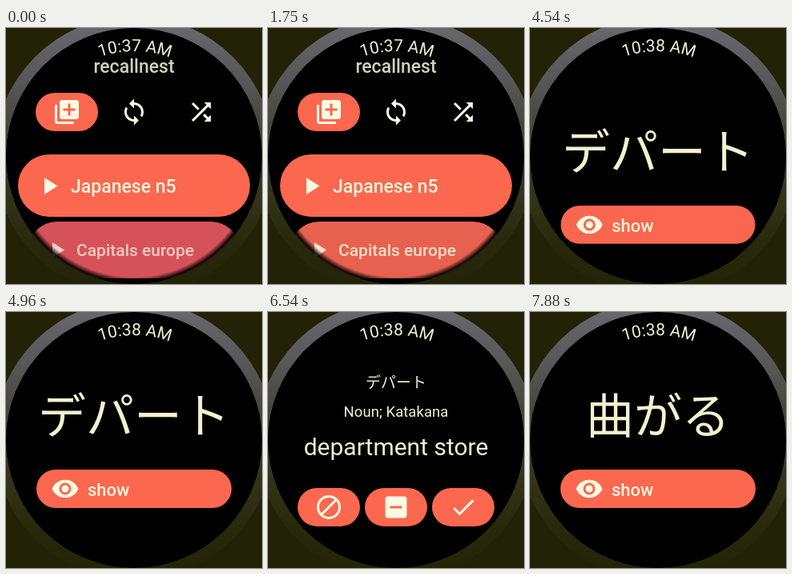
Write an HTML page that moves like this. It is 320 by 320 pixels and loops after 8000 ms.

```html
<!DOCTYPE html>
<html lang="ja">
<head>
<meta charset="utf-8">
<title>Flashcards on a watch</title>
<style>
html, body { margin: 0; width: 100%; height: 100%; overflow: hidden; background: #000; }
svg { display: block; width: 100vw; height: 100vh; font-family: Roboto, "Noto Sans CJK JP", "Noto Sans CJK", sans-serif; }
text { fill: #f3f1cf; }
.label { font-weight: 500; fill: #fff6da; }
.mid { text-anchor: middle; }
.jp { font-family: "Noto Sans CJK JP", "Noto Sans CJK", sans-serif; }
.chip { fill: #fc6750; }
.icon { fill: #fffae2; }
</style>
</head>
<body>
<svg viewBox="0 0 320 320">
  <defs>
    <linearGradient id="bezel" x1="0" y1="0" x2="0" y2="1">
      <stop offset="0" stop-color="#6a6a70"/>
      <stop offset=".22" stop-color="#58585a"/>
      <stop offset=".5" stop-color="#3c3c24"/>
      <stop offset=".8" stop-color="#29290c"/>
      <stop offset="1" stop-color="#222206"/>
    </linearGradient>
    <radialGradient id="rim" gradientUnits="userSpaceOnUse" cx="160" cy="160" r="160">
      <stop offset=".945" stop-opacity="0"/>
      <stop offset=".985" stop-opacity=".9"/>
    </radialGradient>
    <clipPath id="face"><circle cx="160" cy="160" r="159.5"/></clipPath>
    <path id="arc" d="M29 160A131 131 0 0 1 291 160"/>
  </defs>
  <rect width="320" height="320" fill="#222206"/>
  <circle cx="160" cy="160" r="175" fill="url(#bezel)"/>
  <circle cx="160" cy="160" r="160"/>
  <g clip-path="url(#face)">
    <g id="home"></g>
    <g id="question"></g>
    <g id="answer"></g>
  </g>
  <text class="mid" font-size="21"><textPath id="clock" href="#arc" startOffset="50.3%"></textPath></text>
</svg>
<script>
const LOOP = 8000;
const $ = id => document.getElementById(id);
const clamp = v => Math.max(0, Math.min(1, v));
const progress = (t, from, to) => clamp((t - from) / (to - from));
const mix = (a, b, p) => a.map((v, i) => v + (b[i] - v) * p);
const rgb = c => `rgb(${c.map(Math.round)})`;

const ICONS = {
  add: "M4 6H2v14c0 1.1.9 2 2 2h14v-2H4V6zm16-4H8c-1.1 0-2 .9-2 2v12c0 1.1.9 2 2 2h12c1.1 0 2-.9 2-2V4c0-1.1-.9-2-2-2zm-1 9h-4v4h-2v-4H9V9h4V5h2v4h4v2z",
  sync: "M12 4V1L8 5l4 4V6c3.31 0 6 2.69 6 6 0 1.01-.25 1.97-.7 2.8l1.46 1.46C19.54 15.03 20 13.57 20 12c0-4.42-3.58-8-8-8zm0 14c-3.31 0-6-2.69-6-6 0-1.01.25-1.97.7-2.8L5.24 7.74C4.46 8.97 4 10.43 4 12c0 4.42 3.58 8 8 8v3l4-4-4-4v3z",
  shuffle: "M10.59 9.17L5.41 4 4 5.41l5.17 5.17zM14.5 4l2.04 2.04L4 18.59 5.41 20 17.96 7.46 20 9.5V4zm.33 9.41l-1.41 1.41 3.13 3.13L14.5 20H20v-5.5l-2.04 2.04z",
  play: "M8 5v14l11-7z",
  eye: "M12 4.5C7 4.5 2.73 7.61 1 12c1.73 4.39 6 7.5 11 7.5s9.27-3.11 11-7.5c-1.73-4.39-6-7.5-11-7.5zM12 17a5 5 0 1 1 0-10 5 5 0 0 1 0 10zm0-8a3 3 0 1 0 0 6 3 3 0 0 0 0-6z",
  block: "M12 2a10 10 0 1 0 0 20 10 10 0 0 0 0-20zM4 12c0-4.42 3.58-8 8-8 1.85 0 3.55.63 4.9 1.69L5.69 16.9C4.63 15.55 4 13.85 4 12zm8 8c-1.85 0-3.55-.63-4.9-1.69L18.31 7.1C19.37 8.45 20 10.15 20 12c0 4.42-3.58 8-8 8z",
  partial: "M19 3H5c-1.1 0-2 .9-2 2v14c0 1.1.9 2 2 2h14c1.1 0 2-.9 2-2V5c0-1.1-.9-2-2-2zm-2 10H7v-2h10v2z",
  check: "M9 16.17L4.83 12l-1.42 1.41L9 19 21 7l-1.41-1.41z"
};

const icon = (name, x, y, scale = 1.5) =>
  `<path class="icon" d="${ICONS[name]}" transform="translate(${x} ${y}) scale(${scale}) translate(-12 -12)"/>`;
const pill = (x, y, w, h, attrs = "") =>
  `<rect class="chip" x="${x}" y="${y}" width="${w}" height="${h}" rx="${h / 2}" ${attrs}/>`;
const text = (str, x, y, size, cls = "mid", attrs = "") =>
  `<text class="${cls}" x="${x}" y="${y}" font-size="${size}" ${attrs}>${str}</text>`;
// A list row, remembered by its resting centre and height
const row = (y, h, body) => `<g class="row" data-y="${y}" data-h="${h}">${body}</g>`;

$("home").innerHTML =
  text("recallnest", 160, 56, 23, "label mid", 'style="fill:#d2d1bb"') +
  pill(37, 81, 78, 48, 'id="newBtn"') + pill(121, 81, 78, 48, 'id="reviewBtn"') +
  icon("add", 76, 105) + icon("sync", 160, 105) + icon("shuffle", 244, 105) +
  pill(15, 158, 290, 78) + icon("play", 54, 197.5) +
  text("Japanese n5", 81, 206, 23, "label") +
  pill(28, 242, 264, 71, 'id="secondChip"') +
  `<g id="secondLabel">${icon("play", 63.5, 277.5, 1.37)}${text("Capitals europe", 88, 285, 21, "label")}</g>` +
  '<circle cx="160" cy="160" r="160" fill="url(#rim)"/>';

$("question").innerHTML =
  row(128, 60, text("", 160, 152, 60, "mid jp", 'id="word"')) +
  row(221, 48, pill(38, 197, 244, 48) + icon("eye", 74, 221) + text("show", 102, 230, 22, "label"));

$("answer").innerHTML =
  row(88, 20, text("デパート", 160, 95, 19, "mid jp")) +
  row(125, 20, text("Noun; Katakana", 160, 131, 18.6)) +
  row(169, 34, text("department store", 160, 179, 30)) +
  row(244, 48, ["block", "partial", "check"].map((name, i) =>
    pill(37 + 84 * i, 220, 78, 48) + icon(name, 76 + 84 * i, 244)).join(""));

// Rows shrink and dim as they come near the top or bottom edge
function scrollList(id, offset) {
  for (const el of $(id).querySelectorAll(".row")) {
    const y = +el.dataset.y, half = el.dataset.h / 2, at = y + offset;
    const gap = Math.min(at - half, 320 - at - half);
    const near = clamp((52 - gap) / 52);
    el.setAttribute("transform", `translate(160 ${at}) scale(${1 - 0.1 * near}) translate(-160 ${-y})`);
    el.setAttribute("opacity", 1 - 0.2 * near);
  }
}

function show(id, on) { $(id).setAttribute("display", on ? "inline" : "none"); }

function drawHome(t) {
  const settle = progress(t, 0, 830), dim = progress(t, 1670, 1750);
  const settled = mix([214, 82, 90], [243, 101, 80], settle);
  $("secondChip").style.fill = rgb(mix(settled, [231, 97, 80], dim));
  $("secondLabel").setAttribute("opacity", 0.75 + 0.15 * settle - 0.05 * dim);

  const swap = progress(t, 2090, 2210);
  const ripple = swap * (1 - progress(t, 2340, 2540));
  $("newBtn").style.opacity = 1 - swap;
  $("reviewBtn").style.opacity = swap;
  $("reviewBtn").style.fill = rgb(mix([252, 103, 80], [255, 132, 110], ripple));
}

function draw(t) {
  show("home", t < 3500);
  show("question", (t >= 3580 && t < 5540) || t >= 7880);
  show("answer", t >= 5580 && t < 7830);
  $("clock").textContent = t < 2460 ? "10:37 AM" : "10:38 AM";

  drawHome(t);

  $("word").textContent = t < 7000 ? "デパート" : "曲がる";
  const lift = 1 - (1 - progress(t, 4500, 4790)) ** 1.7;
  scrollList("question", t < 4960 ? 32 - 31 * lift : 0);

  const reveal = 1 - (1 - progress(t, 6100, 6880)) ** 1.63;
  scrollList("answer", 72 - 97 * reveal);
}

const start = performance.now();
function tick() {
  draw((performance.now() - start) % LOOP);
  requestAnimationFrame(tick);
}
tick();
</script>
</body>
</html>
```
